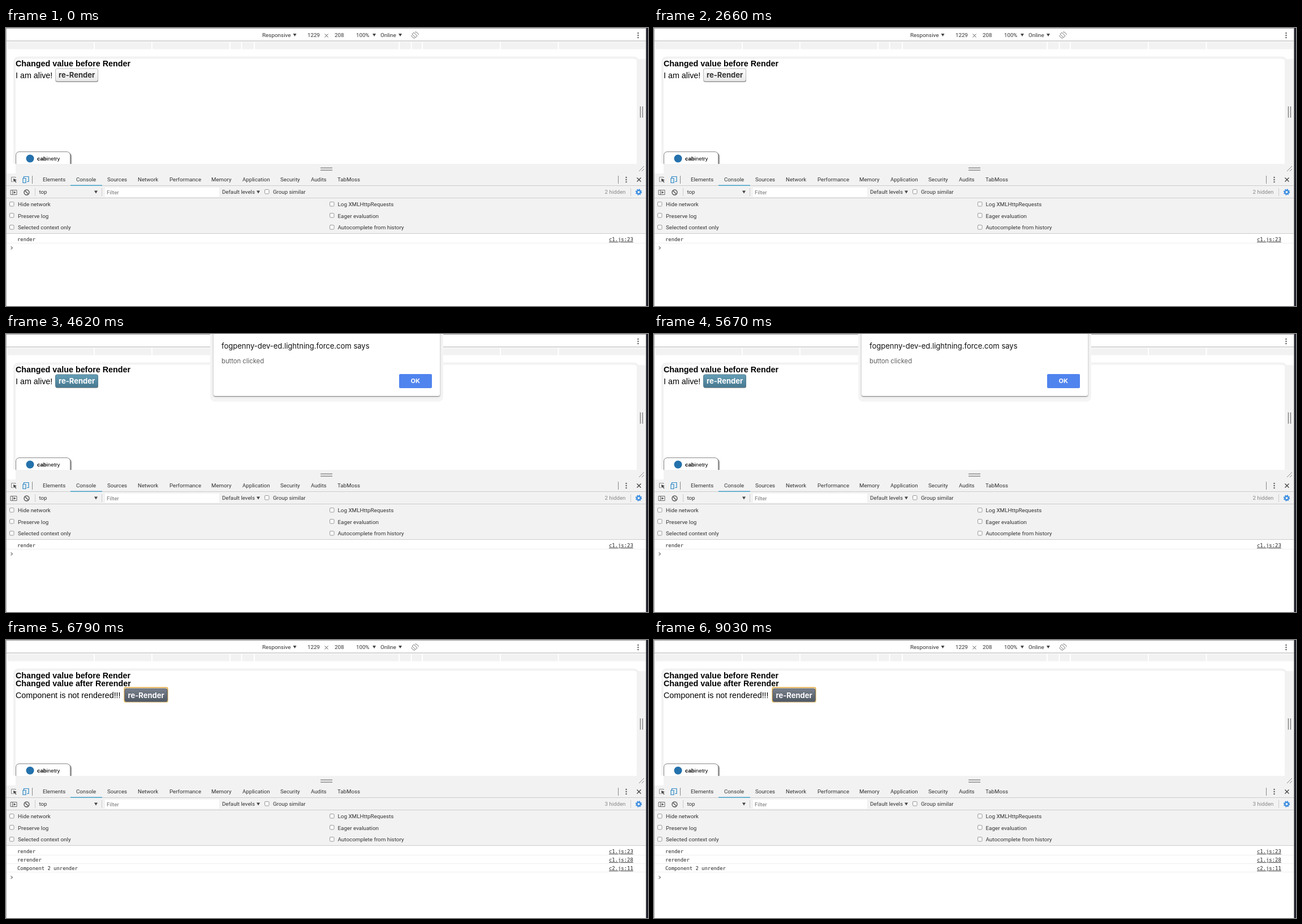
Animation, 1135 px wide and 493 px high, one loop 9.24 s. Source, as an HTML page:

```html
<!DOCTYPE html>
<html lang="en">
<head>
<meta charset="utf-8">
<title>Re-render demo</title>
<style>
html, body { margin: 0; width: 100%; height: 100%; overflow: hidden; background: #fff; }
svg { position: absolute; left: 0; top: 0; }
text { font: 9.7px Roboto, sans-serif; fill: #333; white-space: pre; }
.opt { font-size: 9.85px; }
.page { font: 14.33px "Liberation Sans", Arial, sans-serif; fill: #000; }
.bold { font-weight: bold; }
.log { font: 8.9px "DejaVu Sans Mono", monospace; fill: #222; }
.link { text-decoration: underline; }
.face { font: bold 13px Inter, sans-serif; }
.tag { font: 9.7px "Liberation Sans", Arial, sans-serif; fill: #000; }
#alert {
  position: absolute; left: 366.5px; top: -30px; width: 400.5px; height: 140px;
  background: #fff; border-radius: 3px; transform-origin: 50% 100%;
  box-shadow: 0 1px 1px #0006, 0 1px 4px #0003, 0 4px 0 6px #f5f5f5;
  font-family: Inter, sans-serif;
}
#alert div { position: absolute; white-space: pre; line-height: 16px; }
#alert .title { left: 14.5px; top: 43.3px; font-size: 13px; color: #111; }
#alert .msg { left: 14.5px; top: 70px; font-size: 11.25px; color: #5c5c5c; }
#alert .ok {
  left: 328.5px; top: 100.5px; width: 57.5px; height: 25.5px; border-radius: 2px; background: #5084ee;
  color: #fff; font-size: 11px; font-weight: bold; line-height: 25px; text-align: center;
}
</style>
</head>
<body>
<svg id="stage" width="1135" height="493" viewBox="0 0 1135 493"></svg>
<div id="alert">
  <div class="title">fogpenny-dev-ed.lightning.force.com says</div>
  <div class="msg">button clicked</div>
  <div class="ok">OK</div>
</div>
<script>
const LOOP = 9240, STEP = 70;
const HOVER = 3360, SHOW = 4270, CLOSE = 5810, LEAVE = 6370;
const $ = id => document.getElementById(id);

const text = (x, y, s, cls = '', more = '') => `<text x="${x}" y="${y}" class="${cls}" ${more}>${s}</text>`;
const rect = (x, y, w, h, fill, more = '') =>
  `<rect x="${x}" y="${y}" width="${w}" height="${h}" fill="${fill}" ${more}/>`;
const line = (d, color, width = 1) => `<path d="${d}" fill="none" stroke="${color}" stroke-width="${width}"/>`;
const arrow = (x, y) => `<path d="M${x - 3} ${y - 2.5}h6l-3 5z" fill="#444"/>`;
const box = (x, y) => rect(x + .5, y + .5, 7.5, 7.5, '#fafafa', 'rx="1.5" stroke="#999"');
const dots = (x, y) => [-4, 0, 4].map(d => `<circle cx="${x}" cy="${y + d}" r="1.2" fill="#555"/>`).join('');
const grad = (id, a, b) =>
  `<linearGradient id="${id}" x2="0" y2="1"><stop stop-color="${a}"/><stop offset="1" stop-color="${b}"/></linearGradient>`;
const logRow = (y, s, src) =>
  text(20, y, s, 'log') + text(1066, y, src, 'log link') + rect(1, y + 3, 1130, 1, '#eee');

function emulator() {
  const cuts = [1, 156, 258, 396, 416.5, 439, 695, 716.5, 736, 874, 976.5, 1132];
  let s = cuts.slice(1).map((x, i) => rect(cuts[i] + 1, 25, x - cuts[i] - 2, 12.5, '#f2f2f2')).join('');
  s += rect(0, 0, 1132, 1, '#999') + rect(0, 22.5, 1132, 1, '#aaa');
  s += text(453, 16, 'Responsive', '', 'style="font-size:9.9px"') + text(533, 16, '1229') + text(581, 16, '208') +
    text(619, 16, '100%') + text(662, 16, 'Online', '', 'style="font-size:9.9px"');
  s += [510.5, 651, 697].map(x => arrow(x, 12.5)).join('') + dots(1117.5, 13);
  s += line('M563.5 10.5l6 6m0-6l-6 6', '#555');
  s += line('M721 8l6 6-3 3-6-6zM723 7a5.5 5.5 0 0 1 6 5M723 18a5.5 5.5 0 0 1-6-5', '#777');
  // page surround
  s += line('M15 240V60Q15 52.5 23 52.5H1108Q1115 52.5 1116 56', '#f2f2f2', 4);
  s += rect(1115, 55, 16.5, 204, '#f2f2f2') + rect(17, 241, 1115, 18, '#f2f2f2');
  s += line('M1121.5 139v20M1125.5 139v20M556 248.2h21M556 252.2h21', '#777', 1.3);
  s += line('M1119 254l9-9M1124 254l4-4', '#888');
  return s;
}

function page() {
  return `<path d="M19 241V227q0-6 6-6h84q7 0 7 7v13z" fill="#999"/>
    <path d="M17.5 241V226q0-6.5 6.5-6.5h83q6.5 0 6.5 6.5v15" fill="#fff" stroke="#888"/>
    <circle cx="42.5" cy="231.5" r="7" fill="#2471ac"/>` +
    text(55, 235, '<tspan font-weight="bold">cab</tspan>inetry', 'tag') +
    rect(17, 241, 100, 1.5, '#f2f2f2') +
    text(17, 68, 'Changed value before Render', 'page bold') +
    `<g id="before">${text(17, 88.5, 'I am alive!', 'page')}</g>
    <g id="after">${text(17, 82.3, 'Changed value after Rerender', 'page bold')}
    ${text(17, 102.8, 'Component is not rendered!!!', 'page')}</g>
    <g id="button"><g id="ring">${rect(87, 70.2, 76, 25, 'none', 'rx="2" stroke="#f6dfae" stroke-width="3"')}
    ${rect(87, 70.2, 76, 25, '#fff', 'rx="2" stroke="#dfaa4b" stroke-width="1.6"')}</g>
    ${rect(87.5, 73, 75.5, 22.7, '#777', 'rx="3"')}
    <rect id="plate" x="87.5" y="72" width="75" height="22.5" rx="3"/>
    ${text(93, 88.3, 're-Render', 'face', 'id="label"')}</g>`;
}

function devtools() {
  let s = rect(1, 258, 1131, 107, '#f2f2f2');
  s += [279, 301, 364].map(y => rect(1, y, 1131, 1, '#ccc')).join('');
  const tabs = { Elements: 65, Console: 124, Sources: 179, Network: 233, Performance: 289, Memory: 363,
    Application: 418, Security: 485, Audits: 539, TabMoss: 586 };
  for (const name in tabs) s += text(tabs[name], 272.3, name);
  s += rect(114, 278.4, 56, 1.6, '#4ba4c8');
  s += line('M17 266v-1.5h-7.5v8H12M1082.5 262v14M46.5 262v14', '#888');
  s += '<path d="M13 267l6 2.5-2.5 1 2 3-1.2.8-2-3-1.7 2z" fill="#444"/>';
  s += line('M31.5 266v-2.5h8.5v9h-3M30 266.5h5v8h-5z', '#2b86c5', 1.2);
  s += dots(1096.5, 269) + line('M1115.5 265.5l7 7m0-7l-7 7', '#444', 1.4);
  // filter bar
  s += line('M8 287.5h11v8H8zM11.5 287.5v8', '#666') + '<path d="M13.5 289.3l4 2.2-4 2.2z" fill="#555"/>';
  s += '<circle cx="36.5" cy="291.5" r="4.5" fill="none" stroke="#555" stroke-width="1.4"/>' +
    line('M33.5 288.5l6 6', '#555', 1.4);
  s += line('M51.5 284v14M169.5 284v14M1104.5 284v14', '#ccc');
  s += text(58.5, 294.3, 'top') + arrow(159, 291) + rect(175, 283, 202, 16, '#fff') +
    text(178, 294.8, 'Filter', '', 'style="fill:#777"');
  s += text(382, 294.3, 'Default levels') + arrow(446, 291) + box(457, 286) + text(472, 294.3, 'Group similar');
  s += text(1058.5, 294.3, '', '', 'id="hidden" style="fill:#888"');
  s += '<circle cx="1118.5" cy="291" r="4.7" fill="none" stroke="#3b8ee0" stroke-width="2" stroke-dasharray="1.85"/>' +
    '<circle cx="1118.5" cy="291" r="3.2" fill="none" stroke="#3b8ee0" stroke-width="2.4"/>';
  // settings
  const options = [['Hide network', 'Log XMLHttpRequests'], ['Preserve log', 'Eager evaluation'],
    ['Selected context only', 'Autocomplete from history']];
  options.forEach((pair, row) => pair.forEach((label, col) => {
    const x = col ? 572 : 6, y = 308 + row * 20.5;
    s += box(x, Math.floor(y)) + text(col ? 586.5 : 21, y + 8.3, label, 'opt');
  }));
  // console
  s += logRow(378, 'render', 'c1.js:23');
  s += `<g id="logs">${logRow(393, 'rerender', 'c1.js:28')}${logRow(408, 'Component 2 unrender', 'c2.js:11')}</g>`;
  s += '<path id="prompt" d="M8.5 387.5l3 2.5-3 2.5" fill="none" stroke="#777" stroke-width="1.2"/>';
  return s;
}

$('stage').innerHTML = `<defs>${grad('plain', '#fdfdfd', '#e9e9e9')}${grad('blue', '#669fb7', '#47788f')}
  ${grad('slate', '#78808c', '#505964')}</defs>` + emulator() + page() + devtools() +
  rect(0, 0, 1, 493, '#aaa') + rect(1131, 0, 1, 493, '#888') + rect(1132, 0, 3, 493, '#20202b');

const show = (id, on) => $(id).setAttribute('display', on ? 'inline' : 'none');
const clamp = v => Math.max(0, Math.min(1, v));

function draw(t) {
  const done = t >= CLOSE;
  show('before', !done);
  ['after', 'ring', 'logs'].forEach(id => show(id, done));
  $('button').setAttribute('transform', done ? 'translate(122.5 14.3)' : '');
  $('prompt').setAttribute('transform', done ? 'translate(0 31)' : '');
  $('hidden').textContent = (done ? 3 : 2) + ' hidden';
  const look = t < HOVER ? 'plain' : t < LEAVE ? 'blue' : 'slate';
  $('plate').setAttribute('fill', `url(#${look})`);
  $('plate').setAttribute('stroke', { plain: '#bbb', blue: '#4b7c93', slate: '#59616c' }[look]);
  $('label').style.fill = look === 'plain' ? '#333' : '#fff';

  // the dialog tilts and fades at the window's top edge
  const p = clamp((t - SHOW) / 210) * clamp(1 - (t - CLOSE + 14) / 210);
  const style = $('alert').style;
  style.visibility = p ? 'visible' : 'hidden';
  style.opacity = p;
  style.transform = p === 1 ? 'none'
    : `translateY(${-19 * (1 - p)}px) perspective(200px) rotateX(${6.5 * (1 - p)}deg)`;
}

const start = performance.now();
function tick() {
  const t = (performance.now() - start) % LOOP;
  draw(Math.floor(t / STEP) * STEP);
  requestAnimationFrame(tick);
}
tick();
</script>
</body>
</html>
```
